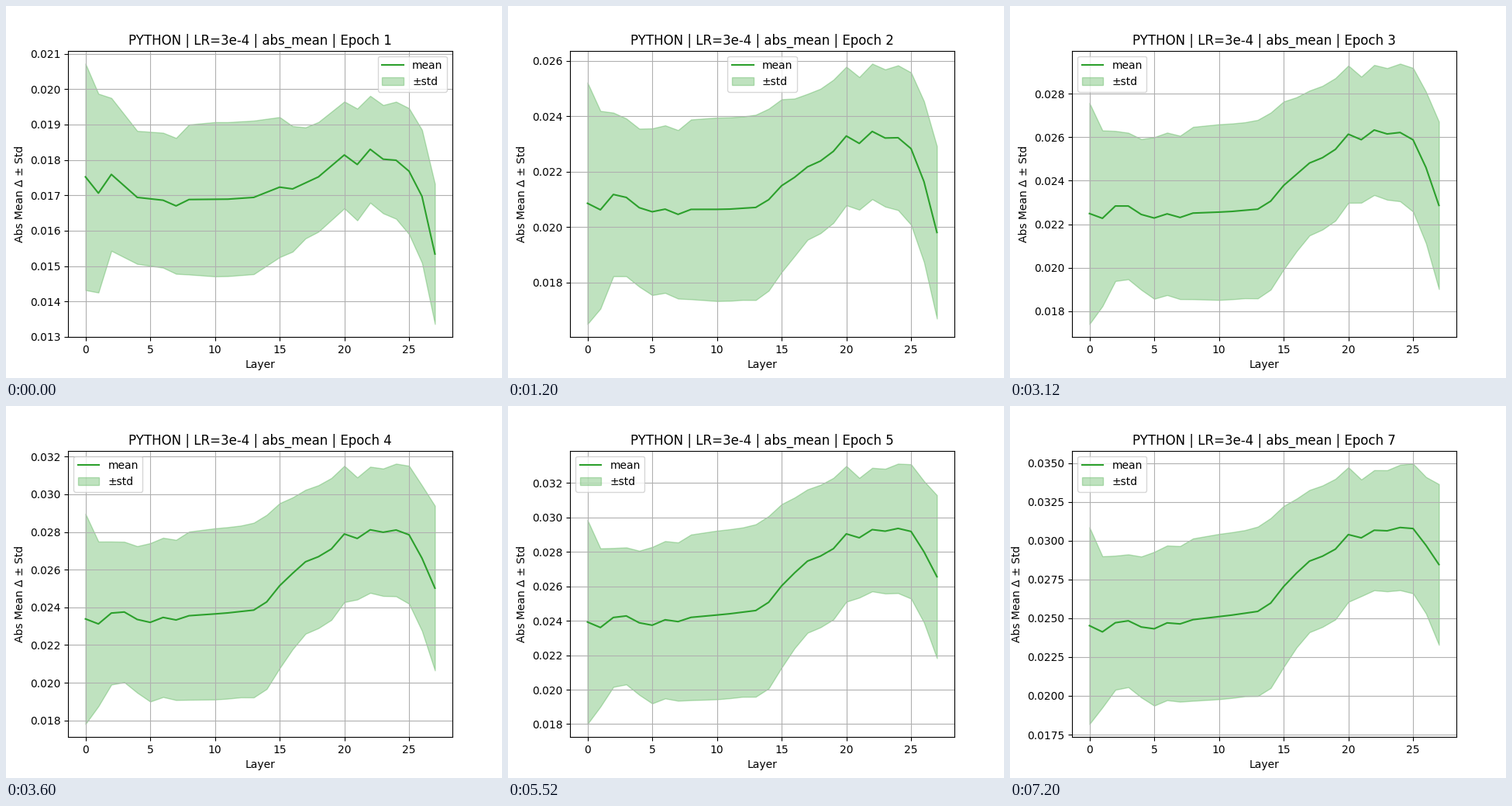
These frames come from a looping animation (640 px wide and 480 px high, 8000 ms). A matplotlib script:

```python
import numpy as np
import matplotlib.pyplot as plt
from matplotlib.animation import FuncAnimation

STEP_MS = 400
STEPS = 20
STEPS_PER_EPOCH = 3
LAST_EPOCH = 7
UNIT = 1e-5  # profile heights are in this unit
FAST, SLOW = 0.37, 0.725  # what remains of each mode after one epoch

layers = np.arange(28)


def profile(knots):
    """Straight lines between a few {layer: value} key points."""
    return np.interp(layers, list(knots), list(knots.values()))


def settled(rate, epoch):
    """Share of an exponential approach done, 0 at the first epoch, 1 at the last."""
    return (1 - rate ** (epoch - 1)) / (1 - rate ** (LAST_EPOCH - 1))


def grow(start, gain, fast_share, epoch):
    fast, slow = settled(FAST, epoch), settled(SLOW, epoch)
    return start + gain * (slow + fast_share * (fast - slow))


mean_start = profile({0: 1752, 1: 1706, 2: 1759, 4: 1694, 6: 1686, 7: 1670,
                      8: 1688, 11: 1689, 13: 1694, 15: 1723, 16: 1718,
                      18: 1752, 20: 1814, 21: 1787, 22: 1830, 23: 1802,
                      24: 1799, 25: 1768, 26: 1697, 27: 1534})
mean_gain = profile({0: 700, 2: 712, 3: 757, 5: 742, 6: 784, 13: 850, 14: 889,
                     16: 1073, 17: 1133, 19: 1162, 20: 1225, 22: 1237,
                     25: 1310, 26: 1273, 27: 1312})
mean_fast = profile({0: 0.50, 1: 0.59, 4: 0.58, 7: 0.49, 10: 0.435,
                     17: 0.335, 22: 0.305, 24: 0.275, 25: 0.23, 27: 0.06})

std_start = profile({0: 320, 1: 281, 2: 216, 4: 188, 7: 192, 8: 212, 10: 218,
                     13: 217, 15: 198, 17: 157, 20: 151, 21: 158, 22: 151,
                     23: 153, 25: 178, 27: 198})
std_gain = profile({0: 314, 1: 206, 3: 226, 5: 306, 12: 318, 14: 340, 16: 302,
                    19: 300, 20: 283, 21: 218, 22: 236, 25: 240, 26: 252, 27: 320})
std_fast = profile({0: 0.15, 20: 0.09, 22: 0.24, 26: 0.27, 27: 0.10})

fig, ax = plt.subplots(figsize=(6.4, 4.8), dpi=100)


def draw(step):
    epoch = step // STEPS_PER_EPOCH + 1
    mean = grow(mean_start, mean_gain, mean_fast, epoch) * UNIT
    std = grow(std_start, std_gain, std_fast, epoch) * UNIT

    ax.clear()
    ax.plot(layers, mean, color="tab:green", label="mean")
    ax.fill_between(layers, mean - std, mean + std,
                    color="tab:green", alpha=0.3, label="±std")
    ax.set_title(f"PYTHON | LR=3e-4 | abs_mean | Epoch {epoch}")
    ax.set_xlabel("Layer")
    ax.set_ylabel("Abs Mean Δ ± Std")
    ax.grid(True)
    ax.legend(loc={1: "upper right", 2: "upper center"}.get(epoch, "upper left"))
    return ax.get_children()


anim = FuncAnimation(fig, draw, frames=STEPS, interval=STEP_MS,
                     init_func=lambda: draw(0), repeat=True, repeat_delay=0)
plt.show()
```
